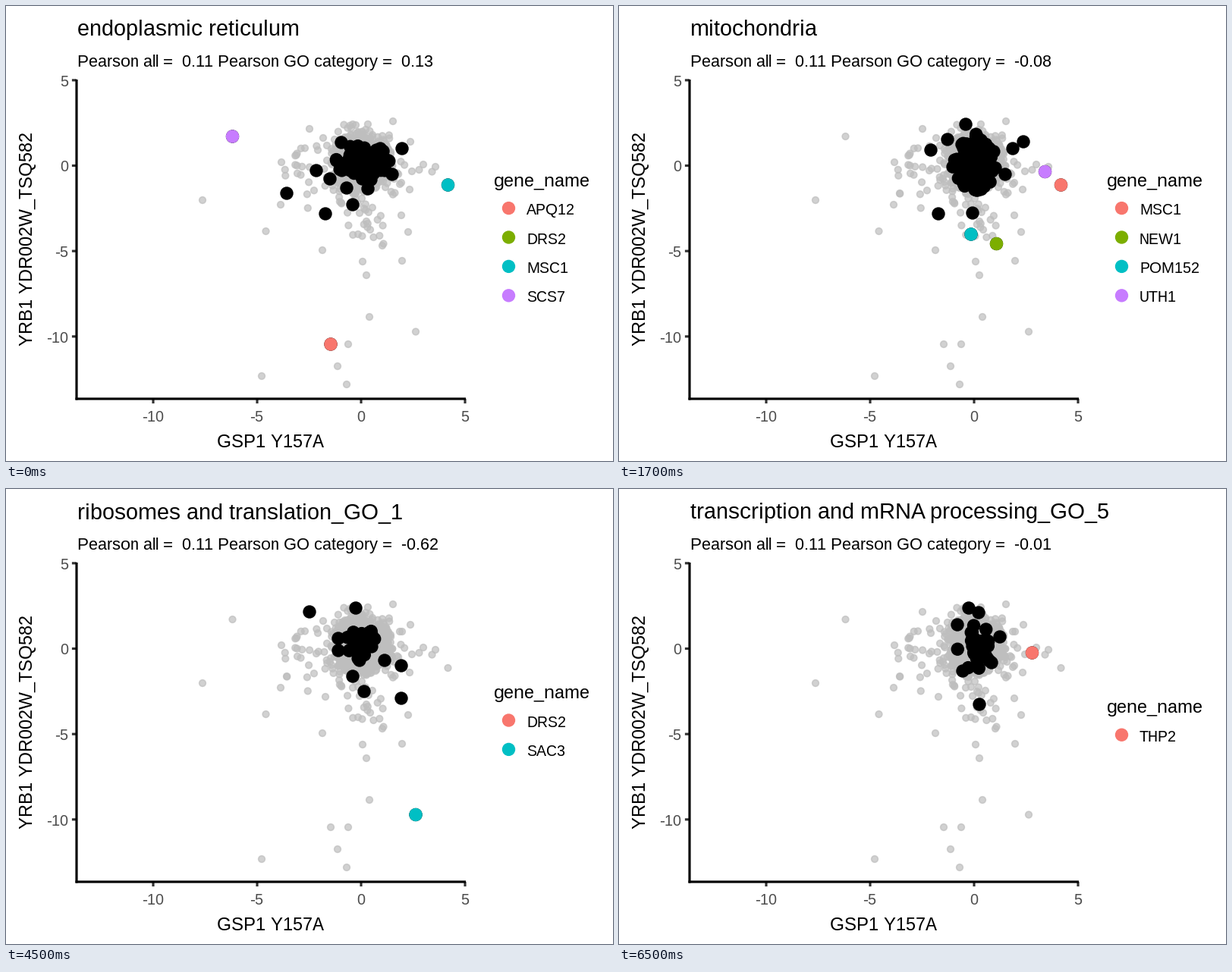
A matplotlib script for the animation above (8000 ms loop, 800x600 px).

```python
import matplotlib.pyplot as plt
import numpy as np
from matplotlib.animation import FuncAnimation

# Whole-pixel glyph advances
plt.rcParams.update({"font.family": "Liberation Sans",
                     "text.hinting": "default", "text.hinting_factor": 1})
DPI, W, H = 160, 800, 600
SALMON, GREEN, TEAL, PURPLE = "#F8766D", "#7CAE00", "#00BFC4", "#C77CFF"
LEFT, RIGHT, TOP, BOTTOM = 93, 605.5, 97.5, 518
LINE = 1.42  # axis line width in points
EDGE = 0.71  # marker outline in points
KEY = 38.4   # legend row height in pixels


def blob(seed, count, center, spread, reach=2.0):
    """Seeded normal cloud kept inside an ellipse of `reach` deviations."""
    z = np.random.default_rng(seed).normal(size=(count, 2))
    return np.array(center) + z[np.hypot(*z.T) < reach] * spread


# start ms, title, correlation, core cloud, stand-out points,
# genes as (name, colour, position or None); positions in stage pixels
SCENES = [
    (0, "endoplasmic reticulum", "0.13", blob(3, 110, (470, 207), (17, 13), 2.1),
     [(370, 247), (409, 217), (421, 274), (427, 228), (457, 262), (449, 240),
      (477, 241), (509, 222), (522, 188), (442, 180)],
     [("APQ12", SALMON, (428, 446)), ("DRS2", GREEN, None),
      ("MSC1", TEAL, (582.5, 236)), ("SCS7", PURPLE, (298.5, 172))]),
    (500, "mitochondria", "-0.08", blob(5, 150, (470, 207), (15, 19), 2.1),
     [(411, 190), (421, 274), (466, 273), (533, 179), (519, 188), (457, 156),
      (509, 222), (433, 176)],
     [("MSC1", SALMON, (582.5, 236)), ("NEW1", GREEN, (497.5, 313.5)),
      ("POM152", TEAL, (464, 301)), ("UTH1", PURPLE, (561.5, 218.5))]),
    (2500, "chromatin organization_GO_2", "0.2", blob(8, 24, (470, 208), (15, 9)),
     [(418, 174), (411, 190), (464, 261), (480, 295), (500, 239), (535, 218),
      (440, 241), (449, 230)],
     [("NUP133", SALMON, (342.5, 297)), ("UTH1", TEAL, (561.5, 218.5))]),
    (4500, "ribosomes and translation_GO_1", "-0.62", blob(9, 28, (472, 204), (12, 14)),
     [(400, 162), (461, 157), (457, 247), (472, 267), (521, 233), (521, 276),
      (438, 197), (438, 213), (499, 226)],
     [("DRS2", SALMON, None), ("SAC3", TEAL, (540, 429.5))]),
    (6500, "transcription and mRNA processing_GO_5", "-0.01",
     blob(12, 30, (473, 209), (14, 15)),
     [(461, 157), (474, 163), (446, 179), (475, 284), (453, 240), (491, 229), (502, 195)],
     [("THP2", SALMON, (544.5, 216))]),
]

# Isolated points that belong to no category
FAR = [(259, 256), (337, 488), (437, 475), (449, 499), (451, 446), (479, 410),
       (475, 355), (522, 336), (470, 337), (417, 322), (530, 298), (363, 206),
       (566, 212), (550, 209), (510, 152), (362, 262), (532, 242), (496, 316)]

fig = plt.figure(figsize=(W / DPI, H / DPI), dpi=DPI, facecolor="white")
ax = fig.add_axes([0, 0, 1, 1])
ax.set(xlim=(0, W), ylim=(H, 0))
ax.axis("off")


def label(x, y, text, size, **kw):
    kw = {"ha": "left", "va": "baseline", "color": "black", **kw}
    return ax.text(x, y, text, fontsize=size, **kw)


def line(xs, ys, color):
    ax.plot(xs, ys, color=color, lw=LINE, solid_capstyle="butt", snap=False)


def dots(points, colors, diameter=7.11, **kw):
    x, y = np.asarray(points, float).T
    # One colour per point keeps sub-pixel positions
    colors = [colors] * len(x) if isinstance(colors, str) else colors
    return ax.scatter(x, y, s=diameter ** 2, c=colors, linewidths=EDGE, **kw)


def draw_axes():
    for value in (-10, -5, 0, 5):
        x, y = 468 + 27.4 * value, 210.5 - 22.53 * value
        line([x, x], [BOTTOM, BOTTOM + 6.1], "#333333")
        line([LEFT - 6.1, LEFT], [y, y], "#333333")
        label(x - 0.5, 547.5, value, 8.8, ha="center", color="#4D4D4D")
        label(82.5, y + 8, value, 8.8, ha="right", color="#4D4D4D")
    line([LEFT, LEFT], [TOP - 0.5, BOTTOM + 1.5], "black")
    line([LEFT - 1.5, RIGHT + 0.5], [BOTTOM, BOTTOM], "black")
    label(349, 582, "GSP1 Y157A", 11, ha="center")
    label(35, 307, "YRB1 YDR002W_TSQ582", 11, ha="center",
          rotation=90, rotation_mode="anchor")


def draw_cloud():
    members = [spot for *_, standouts, genes in SCENES
               for spot in standouts + [g[2] for g in genes if g[2]]]
    points = np.vstack([
        FAR, np.unique(members, axis=0),
        blob(1, 850, (469, 207), (19, 19), 2.2),
        blob(2, 210, (467, 211), (28, 28), 2.1),
        blob(4, 24, (394, 216), (16, 32), 1.8),
        blob(6, 18, (470, 284), (22, 14), 1.9)])
    dots(points, "#BEBEBE", 3.91, alpha=0.7)


def draw_scene(title, correlation, core, standouts, genes):
    first = 324.2 - KEY / 2 * (len(genes) - 1)
    rows = [first + KEY * i for i in range(len(genes))]
    placed = [(spot, color) for _, color, spot in genes if spot]
    keys = [((662.5, y), gene[1]) for y, gene in zip(rows, genes)]
    spots, colors = zip(*placed, *keys)
    return [
        label(93.5, 39, title, 13.2),
        label(93.5, 80, f"Pearson all =  0.11 Pearson GO category =  {correlation}", 9.9),
        label(643, first - 28.7, "gene_name", 11),
        *[label(686, y + 8.5, gene[0], 8.8) for y, gene in zip(rows, genes)],
        dots([*core, *standouts, *[spot for spot, _ in placed]], "black"),
        dots(spots, colors),
    ]


draw_axes()
draw_cloud()
scenes = [(start, draw_scene(*rest)) for start, *rest in SCENES]


def update(frame):
    now = frame * 500
    current = max(i for i, (start, _) in enumerate(scenes) if start <= now)
    for i, (_, artists) in enumerate(scenes):
        for artist in artists:
            artist.set_visible(i == current)
    return []


anim = FuncAnimation(fig, update, frames=16, interval=500, repeat=True,
                     repeat_delay=0, init_func=lambda: update(0))
plt.show()
```
